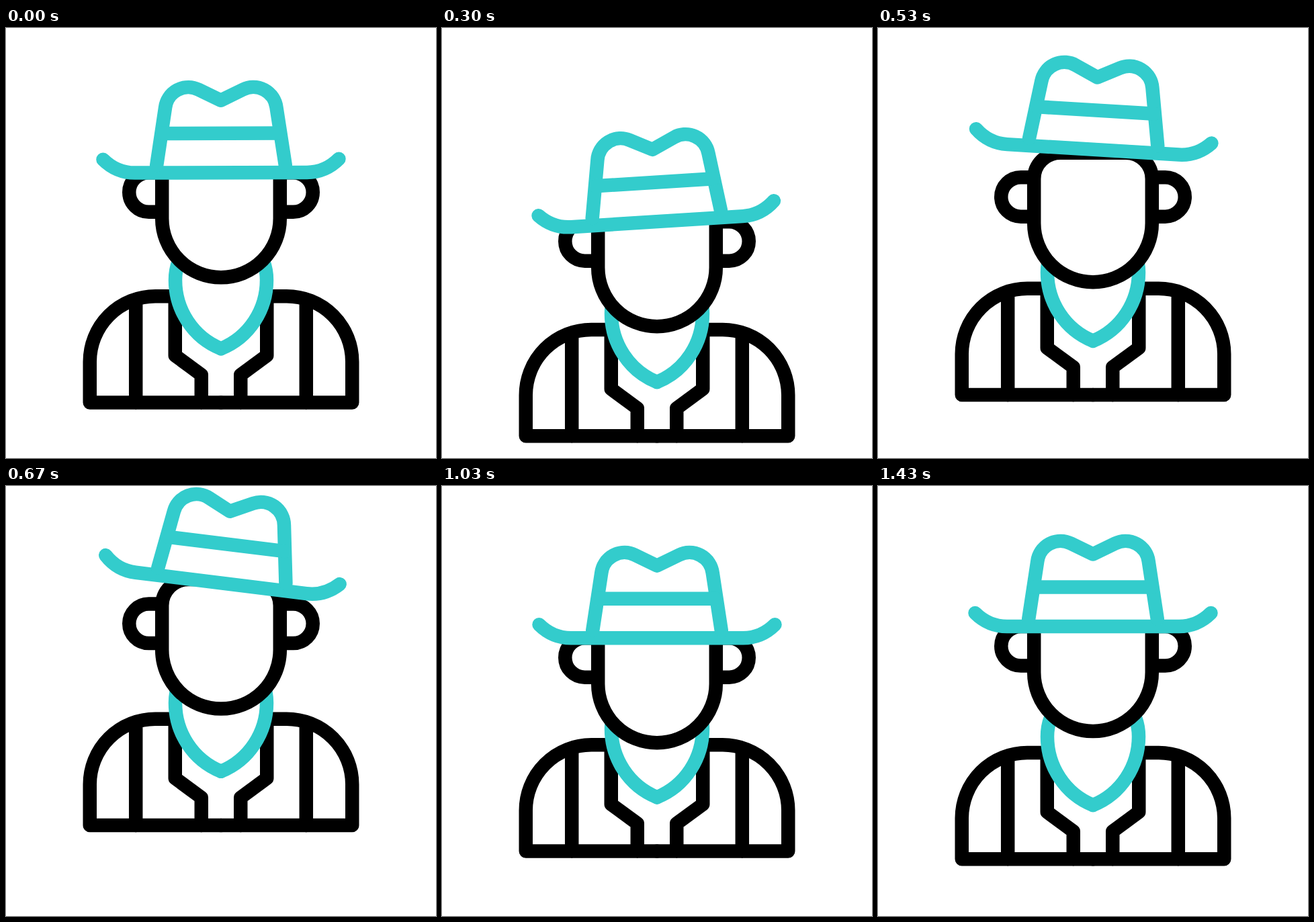
Write an HTML page that moves like this. It is 640 by 640 pixels and loops after 1670 ms.

```html
<!DOCTYPE html>
<html lang="en">
<head>
<meta charset="utf-8">
<title>Jumping cowboy</title>
<style>
  html, body { margin: 0; height: 100%; overflow: hidden; background: #fff; }
  svg { display: block; width: 100%; height: 100%; }
  path { fill: none; stroke: #000; stroke-width: 20.5; stroke-linecap: round; stroke-linejoin: round; }
  .teal { stroke: #3cc; }
  .solid { fill: #fff; }
</style>
</head>
<body>
<svg viewBox="0 0 640 640">
  <g id="body">
    <g id="side">
      <path d="M320 555.2H124.75V494.5a97.5 97.5 0 0 1 97.5-97.5h29.5V485.3l39 28.7v41.5M193.2 403V555.5"/>
      <path class="teal" d="M257 345Q252 358 252 373C252 417 278 458 320 475"/>
    </g>
    <use href="#side" transform="matrix(-1 0 0 1 640 0)"/>
  </g>
  <g id="head">
    <path id="ear" d="M232 209h-19.5a29.25 29.25 0 0 0 0 58.5h19.5"/>
    <use href="#ear" transform="matrix(-1 0 0 1 640 0)"/>
    <path class="solid" d="M232.2 211.5a39 39 0 0 1 39-39h97.6a39 39 0 0 1 39 39v65.8a87.8 87.8 0 0 1-175.6 0Z"/>
  </g>
  <g id="hat" class="teal">
    <path class="teal solid" d="M144.5 189C157 201.5 174 209 192 209H448C466 209 483 201.5 495.5 189"/>
    <path class="teal solid" d="M224.2 198L237.3 112A34.6 34.6 0 0 1 287 85.5L320 101.5L353 85.5A34.6 34.6 0 0 1 402.7 112L415.8 198"/>
    <path class="teal" d="M232 150.5H408"/>
  </g>
</svg>
<script>
  const LOOP = 1670, STEP = 100 / 3, LAST_STEP = 43;

  // Smooth 0 to 1 between two steps.
  function ramp(step, from, to) {
    const s = Math.min(1, Math.max(0, (step - from) / (to - from)));
    return s * s * (3 - 2 * s);
  }

  const place = (id, y, tilt = 0) => document.getElementById(id)
    .setAttribute("transform", `translate(0 ${y}) rotate(${tilt} 320 209)`);

  function draw() {
    const time = performance.now() % LOOP;
    const step = Math.min(LAST_STEP, Math.floor(time / STEP + 0.1));
    const move = (from, to) => ramp(step, from, to);

    // Crouch, jump, land; the head sinks deeper and rebounds.
    const body = 52.5 * move(-1.35, 9.6) - 105.5 * move(9.6, 21.1) + 53 * move(21.1, 35.3);
    const head = 80 * move(-2, 9.7) - 117 * move(9.7, 21.2) + 59 * move(21.2, 33.1) - 22 * move(33.1, 43);
    // The hat flies off the head, tips over and drops back.
    const lift = 42 * (move(16.5, 27) - move(10, 16.5));
    const tilt = -3.75 * move(-1.1, 8.1) + 11.05 * move(8.1, 21.2) - 7.3 * move(21.2, 29.6);

    place("body", body);
    place("head", head);
    place("hat", head + lift, tilt);
    requestAnimationFrame(draw);
  }
  draw();
</script>
</body>
</html>
```
